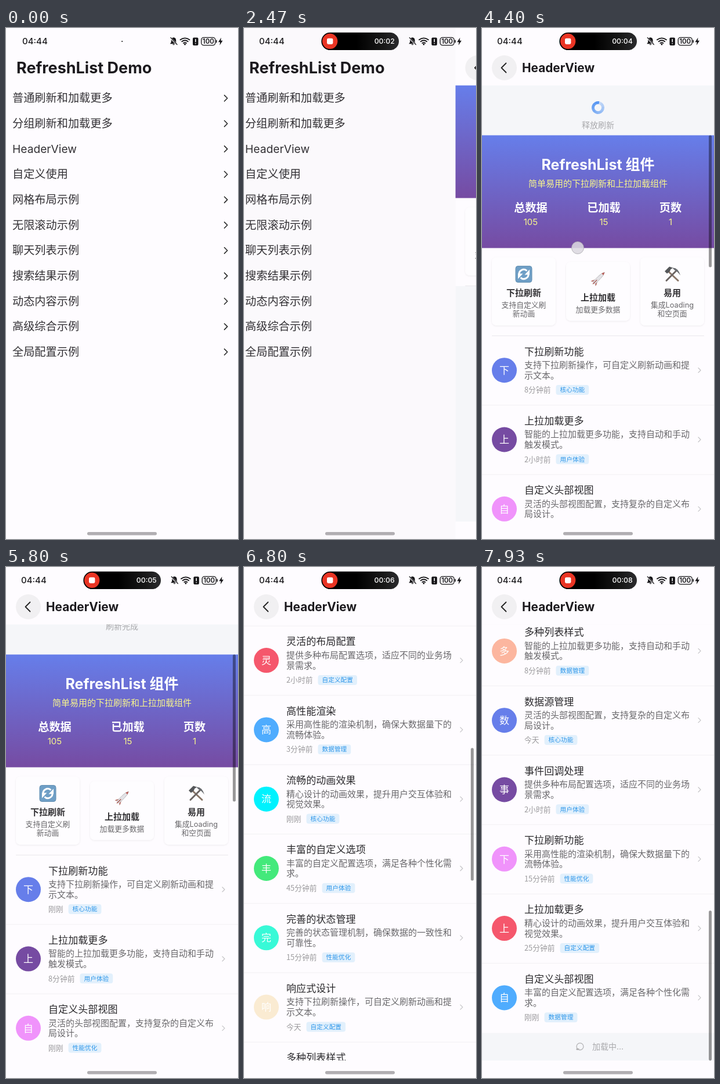
An HTML page for the animation above (8000 ms loop, 400 by 879 pixels).

```html
<!DOCTYPE html>
<html lang="zh-CN">
<head>
<meta charset="utf-8">
<title>RefreshList Demo</title>
<style>
html, body { margin: 0; width: 100%; height: 100%; overflow: hidden; background: #fefcff; }
svg { display: block; width: 100%; height: 100%; font-family: Inter, "Noto Sans CJK SC", "Noto Sans CJK", sans-serif; }
text { white-space: pre; }
.cjk { font-family: "Noto Sans CJK SC", "Noto Sans CJK", sans-serif; }
</style>
</head>
<body>
<svg id="stage" viewBox="0 0 400 879">
  <defs>
    <linearGradient id="banner" x2="0" y2="1"><stop stop-color="#667eea"/><stop offset="1" stop-color="#764ba2"/></linearGradient>
    <linearGradient id="island"><stop offset=".45"/><stop offset=".8" stop-color="#181818"/><stop offset="1" stop-color="#2b2b2d"/></linearGradient>
    <clipPath id="view"><rect y="98.5" width="400" height="750.5"/></clipPath>
    <filter id="soft" x="-20%" y="-20%" width="140%" height="140%"><feDropShadow dx="0" dy="1" stdDeviation="1.4" flood-opacity=".08"/></filter>
  </defs>
</svg>
<script>
const LOOP = 8000, BG = '#fefcff', PANEL = '#f5f6f9';
const TOP = 98.5, BOTTOM = 849, LIST_TOP = 443, PITCH = 119.3;
const OPEN = 2440, LOADED = 3570, RELEASE = 4480, REFRESHED = 5530;
const stage = document.getElementById('stage');

function add(parent, tag, attrs = {}, text) {
  const el = document.createElementNS('http://www.w3.org/2000/svg', tag);
  for (const k in attrs) el.setAttribute(k, attrs[k]);
  if (text !== undefined) el.textContent = text;
  return parent.appendChild(el);
}
const group = (p, attrs) => add(p, 'g', attrs);
const rect = (p, x, y, width, height, fill, rx = 0, more) => add(p, 'rect', { x, y, width, height, fill, rx, ...more });
const circle = (p, cx, cy, r, fill, more) => add(p, 'circle', { cx, cy, r, fill, ...more });
const shape = (p, d, fill, more) => add(p, 'path', { d, fill, ...more });
const line = (p, d, stroke, width, more) => shape(p, d, 'none', {
  stroke, 'stroke-width': width, 'stroke-linecap': 'round', 'stroke-linejoin': 'round', ...more });
// y is the vertical middle of the text
const label = (p, x, y, size, text, fill, more) => add(p, 'text', { x, y: y + size * .37, 'font-size': size, fill, ...more }, text);
const centered = (p, x, y, size, text, fill, more) => label(p, x, y, size, text, fill, { 'text-anchor': 'middle', ...more });
const bold = { 'font-weight': 700 }, semi = { 'font-weight': 600 }, medium = { 'font-weight': 500 };
const move = (el, x, y) => el.setAttribute('transform', `translate(${x} ${y})`);
const show = (el, o) => el.setAttribute('opacity', +o);
const say = (el, s) => { if (el.textContent !== s) el.textContent = s; };

// Home page
const home = group(stage);
rect(home, 0, 0, 400, 879, BG);
label(home, 18, 68, 27, 'RefreshList Demo', '#1c1a1e', bold);
['普通刷新和加载更多', '分组刷新和加载更多', 'HeaderView', '自定义使用', '网格布局示例', '无限滚动示例',
  '聊天列表示例', '搜索结果示例', '动态内容示例', '高级综合示例', '全局配置示例'].forEach((name, i) => {
  const y = 120.3 + i * 43.65;
  label(home, 11, y, 19.2, name, '#333135');
  line(home, `M376.5 ${y - 4.7}l5.2 5.2l-5.2 5.2`, '#222', 1.5);
});
const dim = rect(home, 0, 0, 400, 879, '#000');

// Detail page
const page = group(stage);
rect(page, 0, 0, 400, 879, BG);
circle(page, 38.5, 68.5, 21.5, '#f1f0f2');
line(page, 'M41.5 60.5l-8 8l8 8', '#222', 1.8);
label(page, 69, 68.5, 20.8, 'HeaderView', '#1c1a1e', bold);
const view = group(page, { 'clip-path': 'url(#view)' });
rect(view, 0, TOP, 400, BOTTOM - TOP, PANEL);
const content = group(view);

// Pull-down indicator, sitting above the banner
const ring = group(content);
for (let i = 0; i < 24; i++) {
  const at = k => `${8.5 * Math.cos(k * Math.PI / 12)} ${8.5 * Math.sin(k * Math.PI / 12)}`;
  line(ring, `M${at(i)}A8.5 8.5 0 0 1 ${at(i + 1.1)}`, '#4d90f2', 4.8, { opacity: .28 + .72 * i / 23, 'stroke-linecap': 'butt' });
}
const pullText = centered(content, 200, 80.5, 14, '', '#a9a9ac');

rect(content, 0, TOP, 400, LIST_TOP - TOP + 1, BG);
rect(content, 0, TOP, 400, 194, 'url(#banner)');
centered(content, 200, 149, 25, 'RefreshList 组件', '#fff', bold);
centered(content, 200, 181.5, 15, '简单易用的下拉刷新和上拉加载组件', '#f8f58c');
const [, loadedCount] = [[84, '总数据', '105'], [210, '已加载', '0'], [325, '页数', '1']].map(([x, name, value]) => {
  centered(content, x, 222.5, 19.2, name, '#fff', bold);
  return centered(content, x, 247.5, 15, value, '#f8f58c');
});

function card(x, top, bottom, title, lines) {
  rect(content, x - 55, top, 110, bottom - top, '#fefdff', 8, { filter: 'url(#soft)' });
  centered(content, x, top + 61, 15, title, '#333235', semi);
  lines.forEach((s, i) => centered(content, x, top + 81.7 + i * 15, 12.8, s, '#68676a'));
  return group(content, { transform: `translate(${x} ${top + 29})` });
}
const sync = card(72, 308.5, 425.5, '下拉刷新', ['支持自定义刷', '新动画']);
rect(sync, -14, -14, 28, 28, '#6f9fc6', 4, { stroke: '#6490b2', 'stroke-width': 1 });
for (const turn of [0, 180]) {
  const half = group(sync, { transform: `rotate(${turn})` });
  line(half, 'M-8 1A8 8 0 0 1 5.5 -5.8', '#fff', 3, { 'stroke-linecap': 'butt' });
  shape(half, 'M10 -8V1H1.5Z', '#fff');
}
const rocket = group(card(200, 316.5, 417.5, '上拉加载', ['加载更多数据']), { transform: 'rotate(45)' });
shape(rocket, 'M-2.4 4L-5.5 9V12L-2 9M2.4 4L5.5 9V12L2 9Z', '#c0807a');
shape(rocket, 'M0 -16Q3 -11 2.8 -3L2.6 10H-2.6L-2.8 -3Q-3 -11 0 -16Z', '#e4e3e6', { stroke: '#a9a8ad', 'stroke-width': .7 });
shape(rocket, 'M0 -16Q1.8 -13 2.2 -11H-2.2Q-1.8 -13 0 -16Z', '#b9605a');
line(rocket, 'M0 3V12', '#a5524b', 1.4);
const tools = card(328, 308.5, 425.5, '易用', ['集成Loading', '和空页面']);
line(tools, 'M-8 -6L10 11', '#8a7668', 3);
line(tools, 'M7 -6L-10 11', '#6d6664', 3);
shape(tools, 'M-13 -5L-5 -13L1 -11L-3 -8L-4 -5L-9 -1Z', '#55575a');
shape(tools, 'M0 -11Q10 -12 14 2Q9 -5 4 -7Z', '#696c70');

// List
const list = group(content);
const titles = ['下拉刷新功能', '上拉加载更多', '自定义头部视图', '灵活的布局配置', '高性能渲染', '流畅的动画效果',
  '丰富的自定义选项', '完善的状态管理', '响应式设计', '多种列表样式', '数据源管理', '事件回调处理'];
const details = [
  ['支持下拉刷新操作，可自定义刷新动画和提', '示文本。'], ['智能的上拉加载更多功能，支持自动和手动', '触发模式。'],
  ['灵活的头部视图配置，支持复杂的自定义布', '局设计。'], ['提供多种布局配置选项，适应不同的业务场', '景需求。'],
  ['采用高性能的渲染机制，确保大数据量下的', '流畅体验。'], ['精心设计的动画效果，提升用户交互体验和', '视觉效果。'],
  ['丰富的自定义配置选项，满足各种个性化需', '求。'], ['完善的状态管理机制，确保数据的一致性和', '可靠性。']];
const tags = ['核心功能', '用户体验', '性能优化', '自定义配置', '数据管理'];
const colors = ['#667eea', '#764ba2', '#f093fb', '#f5576c', '#4facfe', '#00f2fe', '#43e97b', '#38f9d7', '#faebd2', '#fcb69f'];
const freshTimes = ['刚刚', '8分钟前', '刚刚', '2小时前', '3分钟前', '刚刚', '45分钟前', '15分钟前', '今天',
  '8分钟前', '今天', '2小时前', '15分钟前', '25分钟前', '刚刚'];
const firstTimes = ['8分钟前', '2小时前', '15分钟前'];
const textWidth = s => [...s].reduce((w, c) => w + (c < '~' ? 7.1 : 12.8), 0);

const rows = freshTimes.map((_, i) => {
  const row = group(list, { transform: `translate(0 ${LIST_TOP + i * PITCH})` });
  rect(row, 0, 0, 400, PITCH + 1, BG);
  if (i) rect(row, 0, 0, 400, 1, '#f2f0f3');
  const title = titles[i % 12];
  circle(row, 38.5, 59.7, 21.5, colors[i % 10]);
  centered(row, 38.5, 59.7, 17, title[0], '#fff');
  label(row, 73, 27.2, 17.1, title, '#2b2a2d', medium);
  details[i % 8].forEach((s, k) => label(row, 73, 50.5 + k * 17.6, 15, s, '#68676a'));
  line(row, 'M373 55.7l4 4l-4 4', '#c4c3c6', 1.2);
  const time = label(row, 73, 93.5, 12.8, '', '#9b9a9d', { class: 'cjk' });
  const badge = group(row), tag = tags[i % 5];
  rect(badge, 0, 85, tag.length * 10.7 + 14, 17, '#e2f0fc', 4);
  label(badge, 7, 93.3, 10.7, tag, '#2f97ea', medium);
  return { time, badge };
});
function setTimes(fresh) {
  rows.forEach(({ time, badge }, i) => {
    const s = !fresh && firstTimes[i] || freshTimes[i];
    say(time, s);
    move(badge, 82 + textWidth(s), 0);
  });
}
rect(content, 17, LIST_TOP, 366, 1, '#eae8ec');

// Ring with a comet circling it
function loader(parent, x, y, scale, phase) {
  const g = group(parent, { transform: `translate(${x} ${y}) scale(${scale})` });
  circle(g, 0, 0, 9, 'none', { stroke: '#b4b4b6', 'stroke-width': 2 });
  const tail = [2.6, 2.1, 1.6, 1.1].map(r => circle(g, 0, 0, r, '#b0b0b2'));
  return t => tail.forEach((c, i) => {
    const a = phase + t / 1200 * 2 * Math.PI - i * .14, u = 14 * Math.cos(a), v = 5 * Math.sin(a);
    c.setAttribute('cx', u * .927 + v * .375);
    c.setAttribute('cy', v * .927 - u * .375);
    show(c, Math.sin(a) < -.2 ? 0 : 1 - i * .2);
  });
}
const waiting = group(content);
const spinWaiting = loader(waiting, 200, 540, 1, Math.PI - 3270 / 1200 * 2 * Math.PI);
centered(waiting, 200, 569.5, 15, '数据加载中...', '#99999c');
const footer = group(list, { transform: `translate(0 ${LIST_TOP + 15 * PITCH})` });
const spinFooter = loader(footer, 169, 24.3, .66, 2.3 - 7930 / 1200 * 2 * Math.PI);
label(footer, 190, 24.3, 14, '加载中...', '#a9a9ac');
const bar = rect(view, 391, TOP, 5, 227, '#000', 2.5, { 'fill-opacity': .4 });

// System chrome
rect(stage, 140, 867, 120, 5.5, '#b1aeb2', 2.7);
const clock = label(stage, 28, 22.7, 15, '04:44', '#1c1b1e', medium);
const icons = group(stage);
shape(icons, 'M289 16.2q4.2 .6 4.2 5v3.2l2 2.8h-12.4l2 -2.8v-3.2q0 -4.4 4.2 -5ZM287 28h4q-2 2.6 -4 0Z', '#161518');
line(icons, 'M283.6 17l11.6 12', BG, 2.6);
line(icons, 'M284 16.6l11 12', '#161518', 1.4);
for (const [r, y] of [[8, 20.3], [5.3, 23.2], [2.6, 26]])
  line(icons, `M${308.5 - r} ${y}Q308.5 ${y - r * .72} ${308.5 + r} ${y}`, '#161518', 1.8);
circle(icons, 308.5, 28, 1.5, '#161518');
rect(icons, 322, 16.5, 9.5, 13.5, '#161518', 2);
line(icons, 'M326.8 19.5v4.2M326.8 26.8v.1', '#fff', 1.6);
rect(icons, 336.8, 16.4, 24, 13.2, 'none', 4, { stroke: '#161518', 'stroke-width': 1.3 });
rect(icons, 362, 20.5, 1.6, 5, '#161518', .8);
centered(icons, 348.8, 23, 11.5, '100', '#161518', semi);
shape(icons, 'M371 16.5L366 24.2H369.2L368.4 29.8L373.6 21.8H370.4Z', '#161518');

const pill = rect(stage, 199, 22, 2, 2, 'url(#island)', 1);
const recorder = group(stage);
circle(recorder, 148.2, 22.8, 13.2, '#ea3524');
rect(recorder, 143, 17.8, 10.4, 10.2, '#fff', 2.4);
const timer = label(recorder, 259.8, 22.7, 12.3, '00:00', '#fff', { 'text-anchor': 'end', ...medium });
const touch = circle(stage, 165, 0, 10.5, '#dcd8e0', { stroke: '#a9a6ad', 'stroke-width': .8, 'fill-opacity': .88 });

// Motion tables: [time, value, easing into it]
const linear = u => u, inOut = u => u * u * (3 - 2 * u), out = u => 1 - (1 - u) ** 2, accel = u => u ** 1.4;
function track(t, steps) {
  const i = steps.findIndex(s => t < s[0]);
  if (i === 0) return steps[0][1];
  if (i < 0) return steps[steps.length - 1][1];
  const [t0, a] = steps[i - 1], [t1, b, ease = inOut] = steps[i];
  return a + (b - a) * ease((t - t0) / (t1 - t0));
}
const spring = s => s <= 0 ? 0 : 1 - (1 + 16 * s) * Math.exp(-16 * s);
const pull = [[4070, 0], [4400, 86, out], [RELEASE, 92], [4680, 86, out], [5720, 86], [5800, 52.5, linear], [6020, 0, out]];
const scroll = [[6130, 0], [6330, 230, accel], [6800, 700, out], [6870, 700], [7070, 945, accel], [7530, 1432, out]];
const thumb = [[4700, 227], [5300, 253], [6130, 253], [6800, 228, linear], [7530, 258, linear]];
const touches = [
  [[2330, 208], [2440, 208]],
  [[4070, 205], [4400, 378, out], [RELEASE, 392]],
  [[6130, 640], [6330, 410, accel]],
  [[6870, 650], [7070, 405, accel]]];

function draw(t) {
  const wide = track(t, [[70, 0], [560, 1, out]]), tall = track(t, [[70, 0], [300, 1, out]]);
  const w = 2 + 131.6 * wide, h = 2 + 28.4 * tall;
  for (const [k, v] of Object.entries({ x: 200.2 - w / 2, y: 22.9 - h / 2, width: w, height: h, rx: h / 2 })) pill.setAttribute(k, v);
  show(recorder, track(t, [[380, 0], [680, 1]]));
  move(clock, -2 * wide, 0);
  move(icons, 1.4 * wide, 0);
  say(timer, '00:0' + Math.max(0, Math.floor((t - 860) / 1003) + 1));

  const opened = spring((t - OPEN) / 1000);
  move(home, -100 * opened, 0);
  show(dim, .12 * opened);
  move(page, 400 * (1 - opened), 0);

  const loaded = t >= LOADED, down = track(t, pull), up = track(t, scroll), done = t >= REFRESHED;
  show(list, loaded);
  show(waiting, !loaded);
  say(loadedCount, loaded ? '15' : '0');
  setTimes(done);
  move(content, 0, down - up);
  spinWaiting(t);
  spinFooter(t);

  show(ring, down > 0 && !done);
  ring.setAttribute('transform', `translate(200 51) rotate(${(t - 4400) * .36 - 80})`);
  say(pullText, done ? '刷新完成' : t > RELEASE ? '正在刷新...' : down > 64 ? '释放刷新' : '下拉刷新');
  move(pullText, 0, done ? -31 : 0);

  const size = track(t, thumb);
  show(bar, track(t, [[4070, 0], [4140, 1]]));
  bar.setAttribute('y', TOP + down + up * size / 750);
  bar.setAttribute('height', size);

  const press = touches.find(p => t >= p[0][0] && t < p[p.length - 1][0]);
  show(touch, !!press);
  if (press) touch.setAttribute('cy', track(t, press));
}
function tick() {
  draw(performance.now() % LOOP);
  requestAnimationFrame(tick);
}
tick();
</script>
</body>
</html>
```
